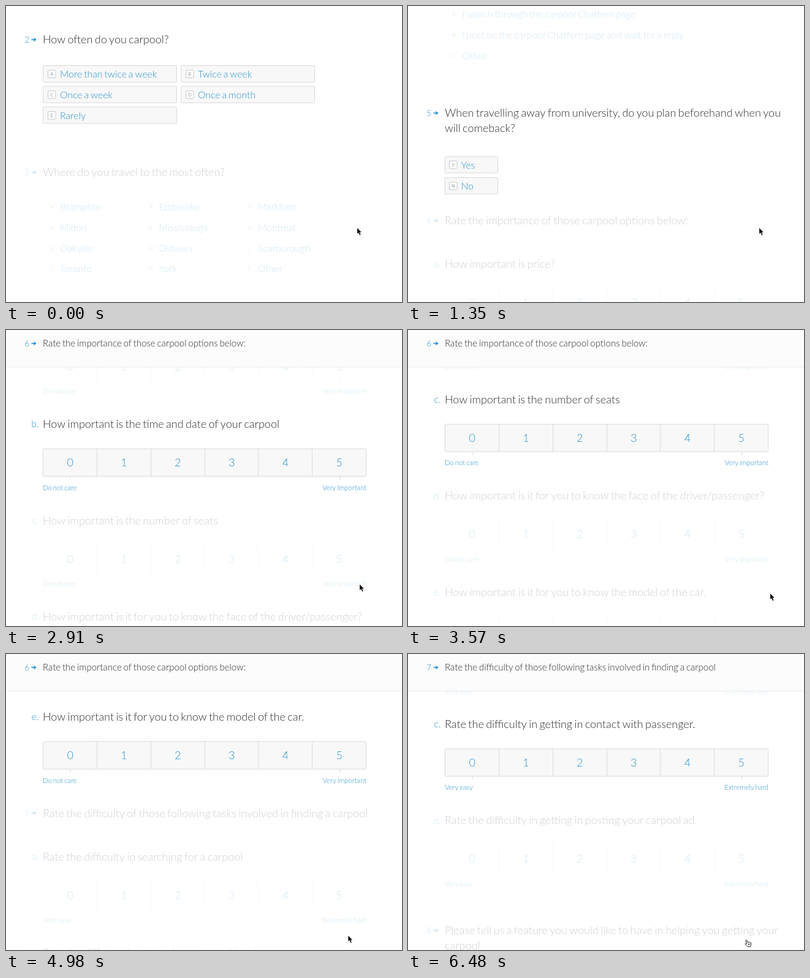
An HTML page with a canvas that plays this animation: 646 by 484 pixels, repeating every 6510 ms.

```html
<!DOCTYPE html>
<html lang="en">
<head>
<meta charset="utf-8">
<title>Carpool survey</title>
<style>
  html, body { margin: 0; width: 100%; height: 100%; overflow: hidden; background: #fff; }
  canvas { display: block; }
</style>
</head>
<body>
<canvas id="stage" width="646" height="484"></canvas>
<script>
const ctx = document.getElementById('stage').getContext('2d');
const LOOP = 6510, STEP = 30;
const INK = '#2c2c2c', BLUE = '#2a92d2', LINE = '#dadada', FILL = '#f8f8f8';
const FOCUS_Y = 215, HEADER_Y = 22, DIM = 0.22;

// Tracks of [time, value], eased with a monotone cubic
const scrollTrack = [[0, 0], [1350, 567], [2280, 810], [3570, 1190.5], [4170, 1369],
  [4290, 1369], [5550, 1720], [6480, 2048], [LOOP, 2057]];
const pointerX = [[0, 573], [1900, 573], [2250, 577], [3330, 577], [3540, 591],
  [3990, 591], [4170, 566], [4500, 566], [5400, 552], [5700, 552], [6400, 549], [LOOP, 549]];
const pointerY = [[0, 363], [1900, 363], [2250, 416], [3330, 416], [3540, 431],
  [3990, 431], [4170, 455], [4500, 455], [5400, 465], [5700, 465], [6400, 467], [LOOP, 467]];

function sample(track, t) {
  const last = track.length - 2;
  const secant = k => (track[k + 1][1] - track[k][1]) / (track[k + 1][0] - track[k][0]);
  const slope = k => {
    if (k === 0) return secant(0);
    if (k > last) return secant(last);
    const a = secant(k - 1), b = secant(k);
    return a * b > 0 ? 2 * a * b / (a + b) : 0;
  };
  let i = 0;
  while (i < last && t >= track[i + 1][0]) i++;
  const [t0, v0] = track[i], [t1, v1] = track[i + 1];
  const d = t1 - t0, u = (t - t0) / d, w = 1 - u;
  return v0 * w * w * (1 + 2 * u) + v1 * u * u * (1 + 2 * w)
    + d * u * w * (w * slope(i) - u * slope(i + 1));
}

// Word spaces are set tight throughout
function text(str, x, y, size, color, align = 'left', weight = 300) {
  ctx.font = `${weight} ${size}px Lato, sans-serif`;
  ctx.wordSpacing = `${-0.083 * size}px`;
  ctx.textAlign = align;
  ctx.fillStyle = color;
  ctx.fillText(str, x, y + size * 0.35);
}

// Boxes fade faster than the text inside them
function box(x, y, w, h, fill, stroke) {
  ctx.save();
  ctx.globalAlpha **= 2;
  ctx.beginPath();
  ctx.roundRect(x + 0.5, y + 0.5, w - 1, h - 1, 1.5);
  ctx.fillStyle = fill;
  ctx.fill();
  ctx.lineWidth = 1;
  ctx.strokeStyle = stroke;
  ctx.stroke();
  ctx.restore();
}

function numberTag(no, y) {
  text(no, 38, y, 13, BLUE, 'right');
  ctx.fillStyle = BLUE;
  ctx.fillRect(41.5, y - 0.8, 5, 1.6);
  ctx.fill(new Path2D(`M45 ${y - 3.4}L49.8 ${y}L45 ${y + 3.4}L46 ${y}Z`));
}

function option(label, key, x, y, w, keyX = 8, textX = 28) {
  box(x, y - 14, w, 28, FILL, LINE);
  box(x + keyX, y - 6.5, 13.5, 13.5, '#fff', '#c2c6ca');
  text(key, x + keyX + 6.75, y + 0.5, 7.5, '#98a1a8', 'center', 400);
  text(label, x + textX, y + 0.5, 15.75, BLUE);
}

function choices(columns, width, labels) {
  labels.forEach((label, i) => option(label, String.fromCharCode(65 + i),
    60 + (i % columns) * (width + 6), 56 + Math.floor(i / columns) * 33.75, width));
}

function yesNo() {
  option('Yes', 'Y', 60, 84.5, 87, 7, 26.5);
  option('No', 'N', 60, 119, 87, 7, 26.5);
}

function scale(letter, title, low, high, y = 0) {
  const cell = 527 / 6;
  text(letter + '.', 53.5, y, 15.75, BLUE, 'right');
  text(title, 60, y, 18, INK);
  box(60, y + 40, 528, 46, FILL, LINE);
  ctx.fillStyle = LINE;
  for (let i = 1; i < 6; i++) ctx.fillRect(Math.floor(60.5 + i * cell), y + 40, 1, 45);
  for (const x of [104.5, 544]) ctx.fillRect(x, y + 85, 1, 6);
  for (let i = 0; i < 6; i++) text(i, 60.7 + (i + 0.5) * cell, y + 63, 18, BLUE, 'center');
  text(low, 60, y + 104, 11.25, BLUE);
  text(high, 588, y + 104, 11.25, BLUE, 'right');
}

// Survey content; height is the distance to the next block
const blocks = [];
let nextY = 55;
function add(height, block) {
  blocks.push({ y: nextY, ...block });
  nextY += height;
  return blocks[blocks.length - 1];
}
const question = (height, no, lines, draw = () => {}) => add(height, { no, lines, draw });
const rating = (letter, title, low, high, height = 157.5) =>
  add(height, { scaleY: 63, draw: () => scale(letter, title, low, high) });
const ratingGroup = (no, heading, title, low, high) =>
  add(228.5, { no, lines: [heading], scaleY: 134, draw: () => scale('a', title, low, high, 71) });

question(217, 2, ['How often do you carpool?'], () => choices(2, 219,
  ['More than twice a week', 'Twice a week', 'Once a week', 'Once a month', 'Rarely']));
question(252, 3, ['Where do you travel to the most often?'], () => choices(3, 155.4,
  ['Brampton', 'Etobicoke', 'Markham', 'Milton', 'Mississauga', 'Montreal',
    'Oakville', 'Oshawa', 'Scarborough', 'Toronto', 'York', 'Other']));
question(218, 4, ['How do you usually find a carpool?'], () => choices(1, 462,
  ['I search through the carpool Chatfern page',
    'I post on the carpool Chatfern page and wait for a reply', 'Other']));
question(176, 5, ['When travelling away from university, do you plan beforehand when you',
  'will comeback?'], yesNo);

const care = 'Do not care', matters = 'Very important';
const importance = ratingGroup(6, 'Rate the importance of those carpool options below:',
  'How important is price?', care, 'Very Important');
rating('b', 'How important is the time and date of your carpool', care, 'Very Important');
rating('c', 'How important is the number of seats', care, matters);
rating('d', 'How important is it for you to know the face of the driver/passenger?', care, matters);
rating('e', 'How important is it for you to know the model of the car.', care, matters);

const easy = 'Very easy', hard = 'Extremely hard';
const difficulty = ratingGroup(7,
  'Rate the difficulty of those following tasks involved in finding a carpool',
  'Rate the difficulty in searching for a carpool', easy, hard);
rating('b', 'Rate the difficulty in getting in contact with driver', easy, hard);
rating('c', 'Rate the difficulty in getting in contact with passenger.', easy, hard);
rating('d', 'Rate the difficulty in getting in posting your carpool ad.', easy, hard, 180);
const feature = question(300, 8,
  ['Please tell us a feature you would like to have in helping you getting your', 'carpool']);

// 0 below the focus line, 1 once a block has passed it
function reached(y) {
  const u = Math.min(1, Math.max(0, (FOCUS_Y + 25 - y) / 50));
  return u * u * (3 - 2 * u);
}

function drawBlock(block, i, scroll) {
  const y = block.y - scroll;
  if (y > 510 || y < -260) return;
  const after = blocks[i + 1];
  const focus = reached(y) * (1 - (after ? reached(after.y - scroll) : 0));
  ctx.save();
  ctx.globalAlpha = DIM + (1 - DIM) * focus;
  ctx.translate(0, y);
  if (block.no) {
    numberTag(block.no, 0);
    block.lines.forEach((line, k) => text(line, 60, k * 25, 18, INK));
  }
  block.draw();
  ctx.restore();
}

function drawHeader(scroll) {
  let group = null;
  if (difficulty.y - scroll < HEADER_Y) group = difficulty;
  else if (importance.y - scroll < HEADER_Y && difficulty.y - scroll > FOCUS_Y) group = importance;
  if (!group) return;
  ctx.fillStyle = '#fcfcfc';
  ctx.fillRect(0, 0, 646, 60);
  ctx.fillStyle = '#ececec';
  ctx.fillRect(0, 60, 646, 1);
  numberTag(group.no, HEADER_Y);
  text(group.lines[0], 60, HEADER_Y, 15, INK);
}

const arrow = new Path2D('M0 0V9.6L2.2 7.6L4 11.8L5.6 11.1L3.9 7H6.8Z');
const hand = new Path2D('M2 1q1.4-.8 2 .6l1 3 1-.6 1.2.4 1.2-.2 1 .6 1 .2q.8 3-.2 4.6l-.6 2H5.4L1 7.6q-.2-1.4 1.4-1l1 .4z'
  + 'M6 6.4l.5 2.6M7.8 6.2l.4 2.6');

function drawPointer(x, y, scroll) {
  const overScale = blocks.some(b => b.scaleY && Math.abs(b.y + b.scaleY - scroll - y) < 22.5);
  const overFeature = y > feature.y - scroll - 15;
  const clickable = x < 588 && (overScale || overFeature);
  ctx.save();
  ctx.translate(x, y);
  ctx.lineJoin = 'round';
  if (clickable) {
    ctx.fillStyle = '#fff';
    ctx.fill(hand);
    ctx.lineWidth = 1;
    ctx.strokeStyle = '#222';
    ctx.stroke(hand);
  } else {
    ctx.lineWidth = 1.4;
    ctx.strokeStyle = '#fff';
    ctx.stroke(arrow);
    ctx.fillStyle = '#111';
    ctx.fill(arrow);
  }
  ctx.restore();
}

function render(now) {
  const t = Math.floor((now % LOOP) / STEP) * STEP;
  const scroll = sample(scrollTrack, t);
  ctx.fillStyle = '#fff';
  ctx.fillRect(0, 0, 646, 484);
  blocks.forEach((block, i) => drawBlock(block, i, scroll));
  drawHeader(scroll);
  drawPointer(sample(pointerX, t), sample(pointerY, t), scroll);
}

const start = performance.now();
function tick() {
  render(performance.now() - start);
  requestAnimationFrame(tick);
}
tick();
</script>
</body>
</html>
```
